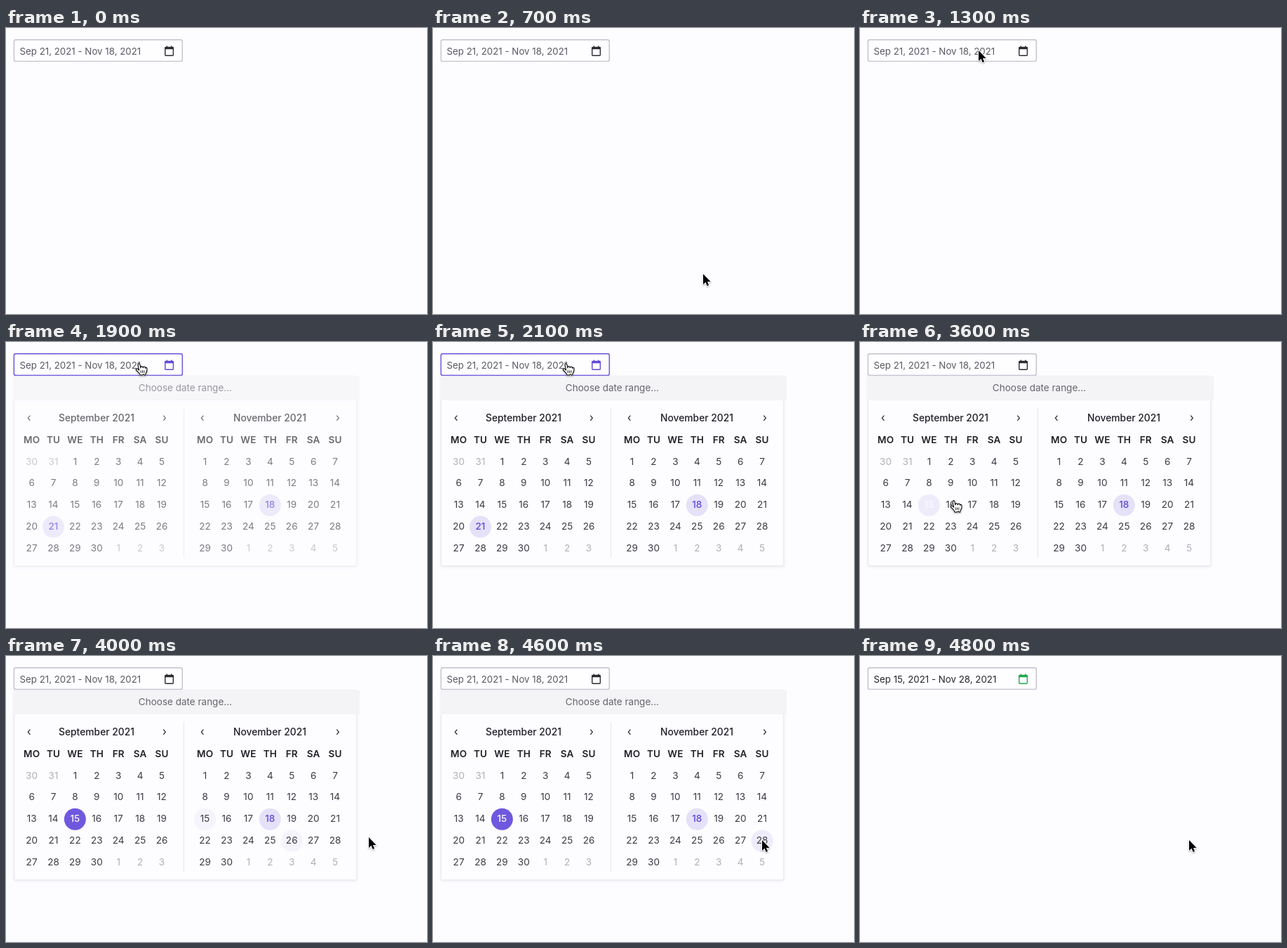
An HTML page with a canvas for the animation above (5800 ms loop, 600 px wide and 407 px high).

```html
<!DOCTYPE html>
<html lang="en">
<head>
<meta charset="utf-8">
<title>Date range picker</title>
<style>
  html, body { margin: 0; width: 100%; height: 100%; overflow: hidden; background: #fdfcff; }
  canvas { display: block; width: 600px; height: 407px; }
</style>
</head>
<body>
<canvas></canvas>
<script>
const canvas = document.querySelector('canvas');
const ctx = canvas.getContext('2d');
const ratio = window.devicePixelRatio || 1;
canvas.width = 600 * ratio;
canvas.height = 407 * ratio;

const LOOP = 5800, STEP = 100;
const BG = '#fdfcff', INK = '#212027', PURPLE = '#5f49d8', TINT = '#e5e1f8', PALE = '#eeebfb';
const PITCH = 30.9, ROW_TOP = 169.6;
const WEEKDAYS = ['MO', 'TU', 'WE', 'TH', 'FR', 'SA', 'SU'];
const MONTHS = [
  { name: 'September 2021', x: 36.6, lead: [30, 31], tail: 3 },
  { name: 'November 2021', x: 283.6, lead: [], tail: 5 }
];

// Pointer tip: time, x, y
const TRACK = [
  [300, 414, 392], [500, 414, 392], [700, 385, 350], [900, 258, 152], [1100, 170, 43],
  [1200, 167, 37], [1300, 169, 32], [1400, 173, 31], [1600, 190, 30.6], [2300, 190, 30.6],
  [2500, 170, 90], [2700, 131, 198], [2800, 117, 213], [2900, 108, 222], [3100, 99, 230],
  [3500, 101, 230], [3600, 134, 225.6], [3800, 290, 238], [4000, 517, 258], [4100, 486, 262],
  [4300, 469, 262], [LOOP, 469, 262]
];

const ARROW = new Path2D('M0 0V15L3.5 11.8 5.7 17 8.1 16 6 10.9H10.7Z');
const HAND = new Path2D('M-4.7 8.2q.9-1.7 2.7-.3l1.6 1.7L-1.9 2.4Q-2.2.2-.8 0q1.3-.2 1.8 2l1 4.2' +
  'q0-1.9 1.3-2.1 1.7-.1 2 2 .5-1.7 1.8-1.5 1.6.1 1.6 2.2.5-1.3 1.4-1 1 .2.9 2.2.2 3-1.3 5.3' +
  '-1 1.2-.9 3.2H7.2l-1.2-1.3-1.3 1.4H1q0-1.6-1.5-3Q-1.6 12.3-4 9.9-4.9 9-4.7 8.2Z');
const KNUCKLES = new Path2D('M2.2 9.8v3.6M4.5 9.8v3.6M6.8 9.8v3.6');

const clamp = v => Math.max(0, Math.min(1, v));

function pointer(t) {
  const i = TRACK.findIndex(key => key[0] > t);
  if (i < 1) return null;
  const [t0, x0, y0] = TRACK[i - 1], [t1, x1, y1] = TRACK[i];
  const k = (t - t0) / (t1 - t0);
  return { x: x0 + (x1 - x0) * k, y: y0 + (y1 - y0) * k };
}

function text(str, x, y, color, size = 13.6, weight = 400, align = 'center') {
  ctx.font = `${weight} ${size}px Inter, sans-serif`;
  ctx.textAlign = align;
  ctx.fillStyle = color;
  ctx.fillText(str, x, y + size * 0.364);
}

function disc(x, y, color, alpha = 1) {
  ctx.save();
  ctx.globalAlpha = alpha;
  ctx.fillStyle = color;
  ctx.beginPath();
  ctx.arc(x, y, 15.5, 0, 7);
  ctx.fill();
  ctx.restore();
}

function stroke(path, color, width) {
  ctx.strokeStyle = color;
  ctx.lineWidth = width;
  ctx.stroke(path);
}

function box(x, y, w, h, r) {
  const path = new Path2D();
  path.roundRect(x, y, w, h, r);
  return path;
}

function drawField(t) {
  const focused = t >= 1800 && t < 3500, done = t >= 4700;
  const frame = box(11.4, 16.7, 239.9, 30.7, 2.5);
  if (focused) stroke(frame, '#e4dffb', 2.6);
  ctx.fillStyle = '#fefdff';
  ctx.fill(frame);
  stroke(frame, focused ? '#6c59d9' : '#c4c1cf', 1.4);

  const color = t >= 4800 ? '#26252b' : done ? '#414046' : '#5a5962';
  text(done ? 'Sep 15, 2021 - Nov 28, 2021' : 'Sep 21, 2021 - Nov 18, 2021', 19.5, 32.8, color, 13.3, 400, 'left');

  const icon = done ? '#21a84f' : focused ? PURPLE : '#2b2a31';
  stroke(box(226.8, 27.4, 11.6, 11.8, 1), icon, 1.4);
  ctx.fillStyle = icon;
  ctx.fillRect(226.4, 27, 12.4, 3.2);
  ctx.fillRect(228.6, 25.5, 1.5, 2);
  ctx.fillRect(235.1, 25.5, 1.5, 2);
}

function drawDay(month, day, muted, x, y, t) {
  const september = month === MONTHS[0];
  const start = !muted && september && day === 15 && t >= 3500;
  const selected = !muted && (september ? day === 21 && t < 3500 : day === 18);
  const over = time => {
    const p = pointer(time);
    return p && time >= 2100 && Math.hypot(p.x - x, p.y - y) < 15.5 ? 0.5 : 0;
  };

  if (start) {
    disc(x, y + 0.8, PALE);
    disc(x, y + 0.8, '#7058de', clamp((t - 3600) / 200));
  } else if (selected) {
    disc(x, y + 0.8, TINT);
  } else {
    const hover = over(t - STEP) + over(t - 2 * STEP);
    if (hover) disc(x, y + 0.8, PALE, hover);
  }
  const color = start ? '#fbfaff' : selected ? PURPLE : muted ? '#b1afb7' : '#3b3a45';
  text(day, x, y, color, 13.6, start || selected ? 500 : 400);
}

function chevron(x, dir) {
  const path = new Path2D(`M${x + 1.5 * dir} 104.6L${x - 1.5 * dir} 108.2L${x + 1.5 * dir} 111.8`);
  stroke(path, INK, 1.2);
}

function drawMonth(month, t) {
  text(month.name, month.x + 92.4, 107.6, INK, 13.85, 500);
  chevron(month.x - 3.7, 1);
  chevron(month.x + 189.2, -1);
  WEEKDAYS.forEach((name, i) => text(name, month.x + i * PITCH, 138.9, INK, 13.6, 600));

  const lead = month.lead.length;
  const count = lead + 30 + month.tail;
  for (let i = 0; i < count; i++) {
    const n = i - lead + 1;
    const muted = n < 1 || n > 30;
    const day = n < 1 ? month.lead[i] : n > 30 ? n - 30 : n;
    drawDay(month, day, muted, month.x + (i % 7) * PITCH, ROW_TOP + Math.floor(i / 7) * PITCH, t);
  }
}

function drawPopup(t) {
  if (t < 1800 || t >= 4700) return;
  const panel = box(11.5, 49, 488.3, 269.8, 1);
  ctx.save();
  ctx.shadowColor = 'rgba(40, 30, 80, .1)';
  ctx.shadowBlur = 4 * ratio;
  ctx.shadowOffsetY = ratio;
  ctx.fillStyle = BG;
  ctx.fill(panel);
  ctx.restore();
  stroke(panel, '#e8e6ec', 1);
  ctx.fillStyle = '#f4f3f5';
  ctx.fillRect(11, 49, 493, 34);
  text('Choose date range...', 255.4, 65.3, '#66656e', 13.5);
  ctx.fillStyle = '#e7e5eb';
  ctx.fillRect(253, 94, 1, 213);
  MONTHS.forEach(month => drawMonth(month, t));

  // Veil that lifts as the popup fades in
  ctx.save();
  ctx.globalAlpha = clamp((2000 - t) / 300);
  ctx.fillStyle = BG;
  ctx.fillRect(0, 0, 600, 407);
  ctx.restore();
}

function drawPointer(t) {
  const p = pointer(t);
  if (!p) return;
  const hand = (t >= 1600 && t < 2500) || (t >= 2900 && t < 3700);
  const shape = hand ? HAND : ARROW;
  ctx.save();
  ctx.translate(p.x, p.y);
  ctx.lineJoin = 'round';
  ctx.save();
  ctx.shadowColor = 'rgba(0, 0, 0, .3)';
  ctx.shadowBlur = 2 * ratio;
  ctx.shadowOffsetY = ratio;
  stroke(shape, '#fff', 2);
  ctx.restore();
  ctx.fillStyle = hand ? '#fff' : '#000';
  ctx.fill(shape);
  if (hand) {
    stroke(HAND, '#111', 1.2);
    stroke(KNUCKLES, '#111', 0.9);
  }
  ctx.restore();
}

const origin = performance.now();

function render() {
  const elapsed = performance.now() - origin;
  const t = Math.floor((elapsed % LOOP) / STEP) * STEP;
  ctx.setTransform(ratio, 0, 0, ratio, 0, 0);
  ctx.fillStyle = BG;
  ctx.fillRect(0, 0, 600, 407);
  drawPopup(t);
  drawField(t);
  drawPointer(t);
  requestAnimationFrame(render);
}

render();
</script>
</body>
</html>
```
